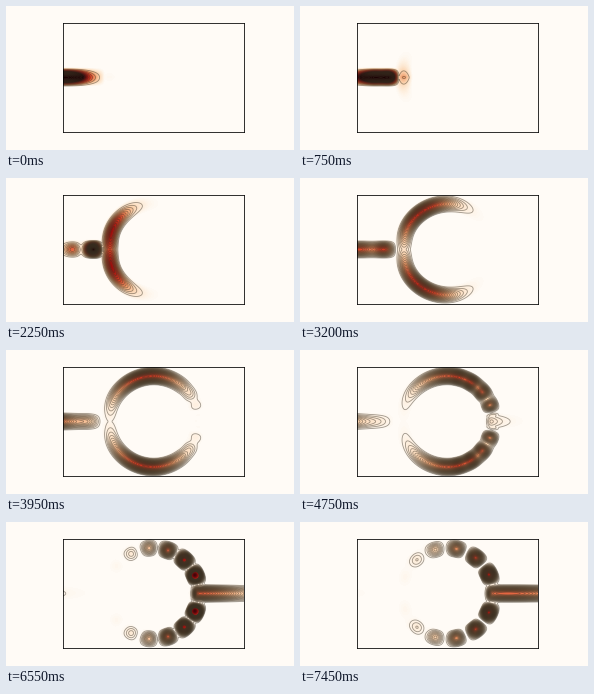
Recreate the animation shown at these times as a matplotlib script. Size 288 by 144 pixels, loop 7500 ms.

```python
import numpy as np
import matplotlib.pyplot as plt
from matplotlib.animation import FuncAnimation
from matplotlib.colors import LinearSegmentedColormap

W, H, DPI = 288, 144, 72
FRAMES, STEP_MS = 150, 50
CREAM = "#fffbf6"
X0, X1, Y0, Y1 = 57, 238, 17, 126

# Ring with two leads, in pixels
CX, CY, R, WIDTH = 147.5, 71.5, 45.5, 20
ARC = np.pi * R
NODE_IN, NODE_OUT = -4.5, 134
REFL_IN, REFL_OUT, LAG = 0.52, 0.63, 14

# Wave packet: start, speed, width, spreading, mass
START, SPEED, SIGMA, SPREAD, MASS = -43, 27, 14.5, 5.1, 0.006

HEAT = LinearSegmentedColormap.from_list("heat", [
    (0, CREAM), (0.03, "#fef0e0"), (0.12, "#fbd3ae"), (0.25, "#f09a68"),
    (0.42, "#dc4428"), (0.65, "#98100e"), (0.85, "#42040a"), (1, "#1c0204")])

xs = np.linspace(X0, X1, 182)
ys = np.linspace(Y0, Y1, 110)
X, Y = np.meshgrid(xs, ys)
radius = np.hypot(X - CX, Y - CY)
arc = R * np.arctan2(np.abs(Y - CY), CX - X)


def across(d):
    """Lowest transverse mode of the channel."""
    return np.where(np.abs(d) < WIDTH / 2, np.cos(np.pi * d / WIDTH) ** 2, 0)


def edge(v, scale):
    return 1 / (1 + np.exp(-np.clip(v / scale, -50, 50)))


RING = across(radius - R + 2 * np.exp(-(arc / 16) ** 2))
RING = RING * edge(137 - arc, 1)
LEAD = across(Y - CY)
LEFT = LEAD * edge(98 - X, 0.8)
RIGHT = LEAD * edge(X - 188.5, 1.2)
s_left = xs - (CX - R)
s_right = xs - (CX + R) + ARC


def packet(s, t, lag=0):
    var = SIGMA ** 2 + (SPREAD * t) ** 2
    u = s - START - SPEED * t
    chirp = SPREAD ** 2 * t / var
    amp = np.sqrt(SIGMA / np.sqrt(var)) * np.exp(-(u + lag) ** 2 / (4 * var))
    return amp * np.exp(1j * MASS * (SPEED * u + chirp * u ** 2 / 2))


def standing(s, t, node, refl, lag=0):
    wave = packet(s, t) - refl * packet(2 * node - s, t, lag)
    return np.abs(wave) ** 2


def density(t):
    arm = (1 - REFL_IN ** 2) / 2
    left = LEFT * standing(s_left, t, NODE_IN, REFL_IN, LAG)
    ring = RING * arm * standing(arc, t, NODE_OUT, REFL_OUT)
    out = 2 * arm * (1 - REFL_OUT ** 2)
    right = RIGHT * out * np.abs(packet(s_right, t)) ** 2
    return np.maximum(np.maximum(left, ring), right)


def level_step(t):
    return 0.0065 + 0.05 * np.exp(-(t / 2) ** 2)


fig = plt.figure(figsize=(W / DPI, H / DPI), dpi=DPI, facecolor=CREAM)
ax = fig.add_axes([X0 / W, 1 - Y1 / H, (X1 - X0) / W, (Y1 - Y0) / H])
ax.set_facecolor(CREAM)
image = ax.imshow(density(0), cmap=HEAT, vmin=0, vmax=0.44, aspect="auto",
                  interpolation="bilinear",
                  extent=(X0 - 0.5, X1 + 0.5, Y1 + 0.5, Y0 - 0.5))
ax.set(xlim=(X0, X1), ylim=(Y1, Y0), xticks=[], yticks=[])
for spine in ax.spines.values():
    spine.set_linewidth(0.8)
lines = []


def update(i):
    t = i * STEP_MS / 1000
    rho = density(t)
    image.set_data(rho)
    while lines:
        lines.pop().remove()
    levels = level_step(t) * np.arange(1, 41)
    levels = levels[levels < rho.max()]
    if len(levels):
        lines.append(ax.contour(xs, ys, rho, levels=levels, colors="#3a3022",
                                linewidths=0.85, alpha=0.48))
    ax.set(xlim=(X0, X1), ylim=(Y1, Y0))
    return [image]


anim = FuncAnimation(fig, update, frames=FRAMES, interval=STEP_MS,
                     repeat=True, repeat_delay=0, blit=False)
plt.show()
```
